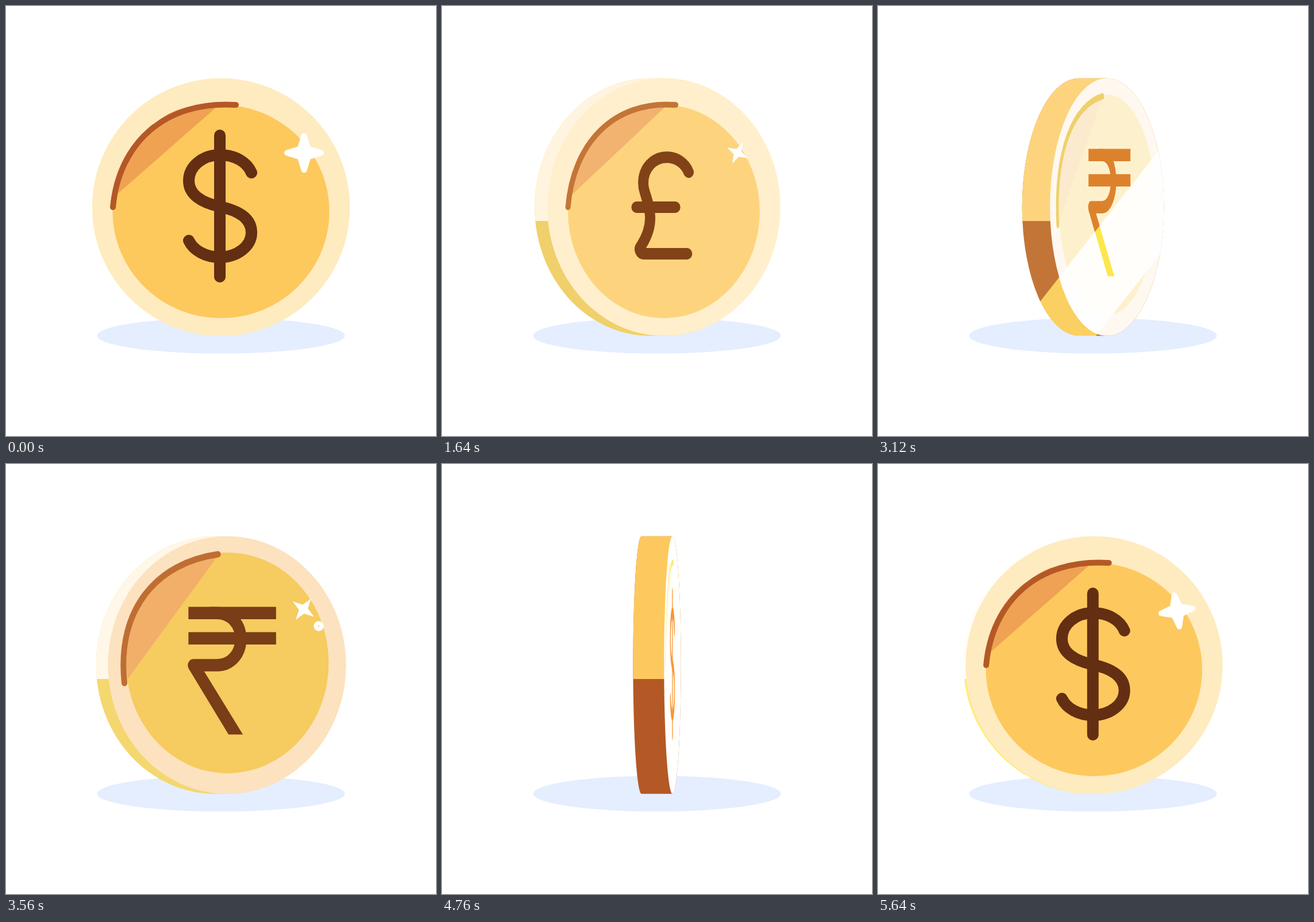
These frames come from a looping animation (748 by 748 pixels, 5.68 s). An HTML page:

```html
<!DOCTYPE html>
<html lang="en">
<head>
<meta charset="utf-8">
<title>Spinning coin</title>
<style>
html, body { margin: 0; width: 100%; height: 100%; overflow: hidden; background: #fff; }
svg { display: block; width: 100vw; height: 100vh; }
.line { fill: none; stroke-linecap: round; stroke-linejoin: round; }
#shine { mix-blend-mode: color-dodge; }
</style>
</head>
<body>
<svg viewBox="0 0 748 748">
  <defs>
    <clipPath id="upper"><rect width="748" height="374"/></clipPath>
    <clipPath id="silhouette"><path id="outline"/></clipPath>
  </defs>
  <rect width="748" height="748" fill="#fff"/>
  <ellipse cx="374" cy="573.5" rx="215.5" ry="31" fill="#e5eeff"/>
  <path id="edgeLow"/>
  <path id="edgeTop" clip-path="url(#upper)"/>
  <g id="face">
    <ellipse id="rim" cy="349.75" ry="224"/>
    <ellipse id="dish"/>
    <path id="shade"/>
    <path id="arc" class="line"/>
    <g id="glyph"></g>
  </g>
  <g clip-path="url(#silhouette)"><path id="unused" d=""/></g>
  <path id="shine" clip-path="url(#silhouette)" fill="#757575" opacity=".92"/>
  <path id="star" fill="#fff" stroke="#fff" stroke-linejoin="round"/>
  <circle id="ring" r="5" fill="none" stroke="#fff" stroke-width="7.5"/>
</svg>
<script>
const FRAME = 40, FRAMES = 142, HALF_TURN = 48;
const CX = 374, CY = 349.75, R = 224, HALF_DEPTH = 27;
const $ = id => document.getElementById(id);
$('unused').parentNode.remove();

const set = (id, attrs) => {
  for (const name in attrs) $(id).setAttribute(name, attrs[name]);
};
const ease = u => (1 - Math.cos(Math.PI * u)) / 2;
const channels = hex => [1, 3, 5].map(i => parseInt(hex.slice(i, i + 2), 16));
const mix = ([from, to], k) => {
  const end = channels(to);
  return `rgb(${channels(from).map((v, i) => Math.round(v + (end[i] - v) * k))})`;
};

// Each pair runs from the unlit colour to the fully lit one.
const GOLD = ['#fdc95d', '#ffffff'];
const COPPER = ['#b45826', '#ffed7c'];
const INK = ['#632e12', '#fb9632'];
const SHADE = ['#efa252', '#fffbec'];

const stroke = (d, width = 20) =>
  `<path class="line" stroke="currentColor" stroke-width="${width}" d="${d}"/>`;

const coins = [
  {
    radius: 224, rim: ['#ffebc0', '#ffffff'], dishColor: GOLD,
    dish: { cx: 0, cy: 357.5, rx: 188.5, ry: 185.5 },
    arc: 'M-188 350C-178 240-99 164 26 172', arcWidth: 10,
    shade: 'M-179 326C-168 235-95 158-8 176Z',
    glyph: stroke('M-2 225V471') +
      stroke('M53 290C45 271 24 259-2 259C-32 259-56 279-56 304C-56 328-34 342-2 349' +
        'C31 356 53 370 53 394C53 418 28 437-2 437C-27 437-48 425-56 408'),
    star: { x: 144.5, y: 255.5, tip: 29.5, waist: 7, round: 10 }
  },
  {
    radius: 226, rim: ['#ffebc0', '#ffffff'], dishColor: GOLD,
    dish: { cx: 0, cy: 357.5, rx: 186, ry: 185.5 },
    arc: 'M-186 350C-176 240-99 164 23 172', arcWidth: 10,
    shade: 'M-178 328C-166 235-92 160 1 177Z',
    glyph: stroke('M-53 350H22') +
      stroke('M48 289C41 273 24 263 6 263C-20 263-40 282-40 308Q-40 316-37 324' +
        'C-28 350-16 378-44 417C-50 424-45 431-38 431H45'),
    star: { x: 143, y: 255.5, tip: 34.5, waist: 8.5, round: 0 }
  },
  {
    radius: 224, rim: ['#fbddb4', '#ffffff'], dishColor: ['#f5c247', '#fffdee'],
    dish: { cx: 1, cy: 346, rx: 190.6, ry: 192 },
    arc: 'M-193 381C-208 250-130 172-17 157', arcWidth: 11,
    shade: 'M-187 374C-202 250-130 176-19 162Z',
    glyph: '<path fill="currentColor" d="M-72.5 248.5H92.5V270H-72.5Z' +
      'M-72.5 292.5H92.5V314H-72.5ZM-72 356L3 470.5H30L-54 344Z"/>' +
      stroke('M-30 259.2H-19C8 259.2 26 279 26 304.5C26 330 8 350-19 350H-63', 21.5),
    star: { x: 144, y: 252.5, tip: 35.5, waist: 8.5, round: 0 }, ring: true
  }
];

function starPath(tip, waist) {
  const points = [];
  for (let i = 0; i < 8; i++) {
    const a = i * Math.PI / 4, r = i % 2 ? waist * Math.SQRT2 : tip;
    points.push(`${(r * Math.sin(a)).toFixed(2)} ${(-r * Math.cos(a)).toFixed(2)}`);
  }
  return `M${points.join('L')}Z`;
}

function edgePath(shift, rx) {
  const top = CY - R, bottom = CY + R, left = CX - shift, right = CX + shift;
  return `M${left} ${top}A${rx} ${R} 0 0 0 ${left} ${bottom}` +
    `H${right}A${rx} ${R} 0 0 0 ${right} ${top}Z`;
}

function shinePath(step) {
  const x = 483 + 70 * (step + 17), lean = 180, half = 72;
  return `M${x + lean - half} 121H${x + lean + half}L${x - lean + half} 579H${x - lean - half}Z`;
}

let current;
function useCoin(coin) {
  if (coin === current) return;
  current = coin;
  set('rim', { rx: coin.radius });
  set('dish', coin.dish);
  set('shade', { d: coin.shade });
  set('arc', { d: coin.arc, 'stroke-width': coin.arcWidth });
  $('glyph').innerHTML = coin.glyph;
  set('star', { d: starPath(coin.star.tip, coin.star.waist), 'stroke-width': coin.star.round });
}

function draw(frame) {
  // The second and third coins skip their exactly frontal pose.
  const turn = frame + (frame >= 48) + (frame >= 95);
  const half = Math.round(turn / HALF_TURN);
  const step = turn - half * HALF_TURN;
  const coin = coins[half % coins.length];
  const angle = step * Math.PI / HALF_TURN;
  const squash = Math.max(0, Math.cos(angle));
  const faceX = CX - HALF_DEPTH * Math.sin(angle);
  const lit = ease(Math.abs(step) / 24);
  useCoin(coin);

  const d = edgePath(Math.abs(HALF_DEPTH * Math.sin(angle)), R * squash);
  set('edgeLow', { d, fill: mix(COPPER, 1 - lit) });
  set('edgeTop', { d, fill: mix(GOLD, 1 - lit) });
  set('outline', { d });

  set('face', { transform: `translate(${faceX} 0) scale(${squash} 1)` });
  set('rim', { fill: mix(coin.rim, lit) });
  set('dish', { fill: mix(coin.dishColor, lit) });
  set('shade', { fill: mix(SHADE, lit) });
  set('arc', { stroke: mix(COPPER, lit) });
  set('glyph', { color: mix(INK, lit) });

  set('shine', { d: step < -7 ? shinePath(step) : '' });

  const size = Math.max(0, 1 - Math.abs(step) / 17);
  const { x, y } = coin.star;
  set('star', {
    transform: `translate(${faceX + x * squash} ${y}) rotate(${step * 9}) scale(${size})`
  });
  const ringSize = coin.ring ? Math.min(1, size * 1.7) : 0;
  set('ring', { transform: `translate(${faceX + 172.8 * squash} 282) scale(${ringSize})` });
}

const start = performance.now();
function tick() {
  draw(Math.floor((performance.now() - start) / FRAME) % FRAMES);
  requestAnimationFrame(tick);
}
tick();
</script>
</body>
</html>
```
